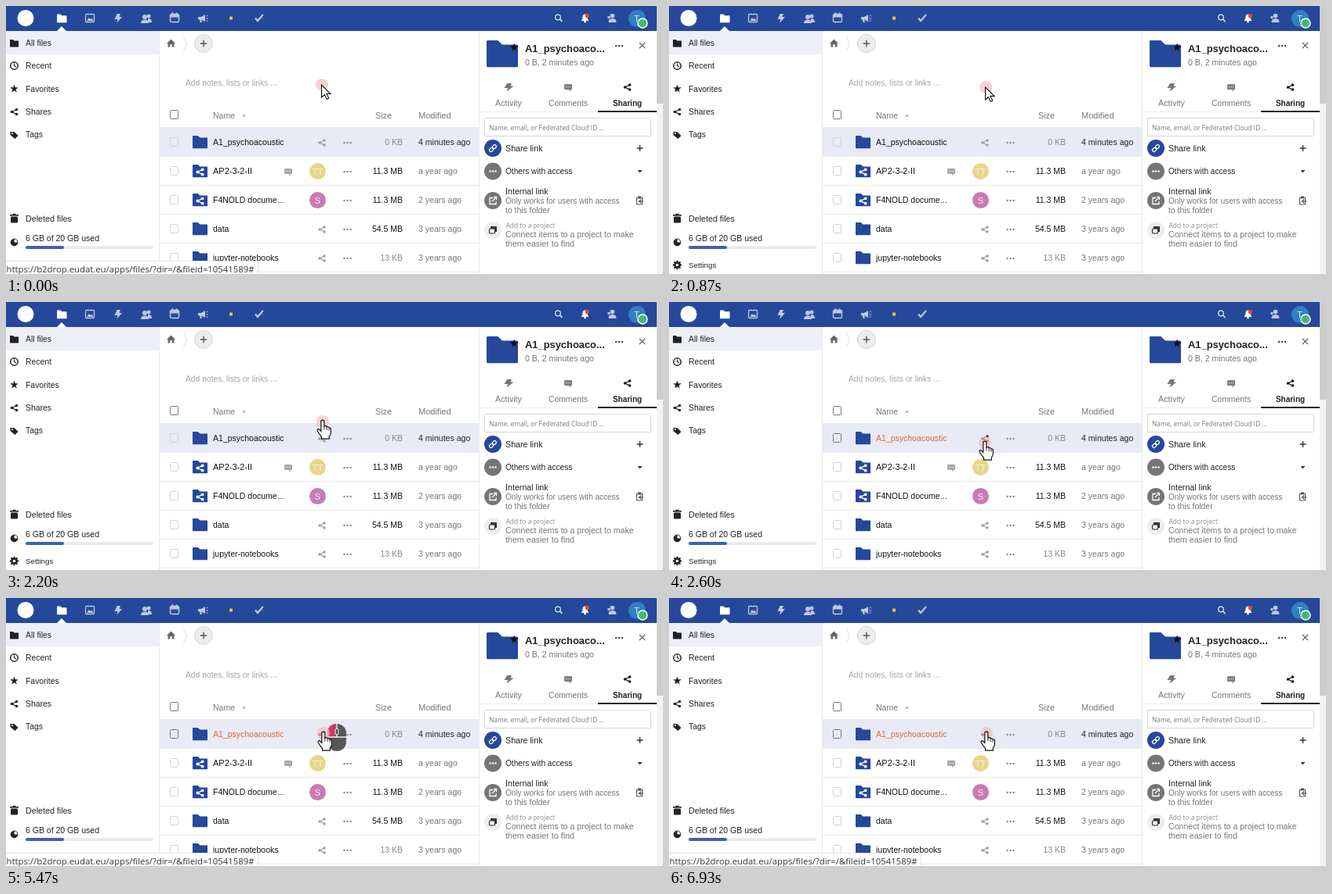
An HTML page with a canvas for the animation above (8000 ms loop, 838 by 343 pixels).

```html
<!DOCTYPE html>
<html lang="en">
<head>
<meta charset="utf-8">
<title>File sharing</title>
<style>
html, body { margin: 0; width: 100%; height: 100%; overflow: hidden; background: #fff; }
canvas { display: block; width: 838px; height: 343px; }
</style>
</head>
<body>
<canvas id="stage"></canvas>
<script>
const W = 838, H = 343, LOOP = 8000, FPS = 15;
const BLUE = '#25489a', INK = '#222', GREY = '#767676', LINE = '#e9e9e9', TINT = '#e8ebf5';
const SANS = '"Liberation Sans", Arial, sans-serif';
const HUMAN = '"Open Sans", sans-serif';
const canvas = document.getElementById('stage');
const c = canvas.getContext('2d');
const ratio = window.devicePixelRatio || 1;
canvas.width = W * ratio;
canvas.height = H * ratio;

function text(str, x, y, color = INK, size = 10.5, align = 'left', weight = 'normal', family = SANS) {
  c.font = `${weight} ${size}px ${family}`;
  c.textAlign = align;
  c.fillStyle = color;
  c.fillText(str, x, y);
}
function rect(x, y, w, h, color) {
  c.fillStyle = color;
  c.fillRect(x, y, w, h);
}
function round(x, y, w, h, r, fill, stroke, width = 1) {
  c.beginPath();
  c.roundRect(x, y, w, h, r);
  paint(fill, stroke, width);
}
function paint(fill, stroke, width = 1) {
  if (fill) { c.fillStyle = fill; c.fill(); }
  if (stroke) { c.strokeStyle = stroke; c.lineWidth = width; c.stroke(); }
}
function disc(x, y, r, fill, stroke, width) {
  c.beginPath();
  c.arc(x, y, r, 0, 7);
  paint(fill, stroke, width);
}
// SVG path data drawn around (x, y)
function shape(d, x, y, fill, stroke, width = 1) {
  c.save();
  c.translate(x, y);
  const p = new Path2D(d);
  if (fill) { c.fillStyle = fill; c.fill(p); }
  if (stroke) { c.strokeStyle = stroke; c.lineWidth = width; c.stroke(p); }
  c.restore();
}
function faded(alpha, draw) {
  if (alpha <= 0) return;
  c.save();
  c.globalAlpha = alpha;
  draw();
  c.restore();
}

function folder(x, y, w, color) {
  const k = w / 14;
  c.save();
  c.translate(x, y);
  c.scale(k, k);
  c.fillStyle = color;
  c.fill(new Path2D('M.5 0H5L7 1.9H13.5Q14 1.9 14 2.4V11.5Q14 12 13.5 12H.5Q0 12 0 11.5V.5Q0 0 .5 0Z'));
  c.restore();
}
function share(x, y, color, k = 1) {
  shape(`M${3 * k} ${-3 * k}L${-3 * k} 0L${3 * k} ${3 * k}`, x, y, null, color, 1.3 * k);
  for (const [dx, dy] of [[3, -3], [-3, 0], [3, 3]]) disc(x + dx * k, y + dy * k, 1.8 * k, color);
}
function dots(x, y, color, gap = 4, r = 1.2) {
  for (let i = -1; i < 2; i++) disc(x + i * gap, y, r, color);
}
function comment(x, y, color) {
  round(x - 5, y - 4, 10, 7, 1, color);
  shape('M0 2L3 2L3 5.5Z', x, y, color);
  dots(x, y - 0.5, '#fff', 2.4, 0.6);
}
function star(x, y, r, color) {
  c.beginPath();
  for (let i = 0; i < 10; i++) {
    const a = i * Math.PI / 5 - Math.PI / 2, q = i % 2 ? r * 0.42 : r;
    c.lineTo(x + q * Math.cos(a), y + q * Math.sin(a));
  }
  paint(color);
}
function people(x, y, color) {
  disc(x + 3, y - 3, 2.5, color);
  shape('M2 0Q7 0 7 5L2 5Z', x, y, color);
  disc(x - 2, y - 2, 3, color);
  shape('M-7 6Q-7 1.5 -2 1.5Q3 1.5 3 6Z', x, y, color);
}
function plus(x, y, r, color) {
  shape(`M${-r} 0H${r}M0 ${-r}V${r}`, x, y, null, color, 1.4);
}

function header() {
  rect(0, 0, 830, 32, BLUE);
  const soft = '#bcc8e2';
  disc(25, 15.5, 10.5, '#fff');
  folder(65, 10.5, 12.5, '#fff');
  shape('M-6 0L0 -6L6 0Z', 71, 32, '#fff');
  round(101.5, 10.5, 11, 10, 1, null, soft, 1.3);
  shape('M-4 3L-1 -1L1 1L2.5 -.5L4.5 3Z', 107, 16, soft);
  shape('M-1.5 -6L3 -6L1.5 -2L5 -2L-2 6L-.5 1L-4.5 1Z', 143, 16, soft);
  people(179, 16, soft);
  round(209.5, 10.5, 11, 10, 1.5, null, soft, 1.4);
  rect(210, 11, 10, 3.5, soft);
  rect(211.5, 8.5, 2, 3, soft);
  rect(216.5, 8.5, 2, 3, soft);
  shape('M-6 -2L-2 -2L3 -5L3 4L-2 1.5L-1 5L-3.5 5L-4 1.5L-6 1.5Z', 251, 16, soft);
  shape('M4.5 -3L6.5 -4M4.5 0H7M4.5 2.5L6.5 3.5', 251, 16, null, soft, 1);
  rect(285, 13.5, 4, 4, '#d9c65b');
  shape('M-5 0L-2 3.5L5 -4.5', 323, 15.5, null, soft, 2.2);

  disc(704, 14.5, 3.3, null, '#dce3f1', 1.3);
  shape('M2 2.5L5.5 6', 704, 14, null, '#dce3f1', 1.7);
  shape('M-5 4Q-3 2 -3 -1Q-3 -4.5 0 -4.5Q3 -4.5 3 -1Q3 2 5 4Z', 738.5, 15, '#fff');
  disc(738.5, 20, 1.4, '#fff');
  disc(741.5, 12.5, 2.7, '#e9402d');
  disc(773.5, 12.5, 2.8, soft);
  shape('M-5 5Q-5 0 0 0Q5 0 5 5Z', 773.5, 16, soft);
  disc(769, 14.5, 1.8, soft);
  disc(805, 16, 11, '#317fc3');
  text('T', 804.5, 20, '#d7e8f7', 11.5, 'center');
  disc(812, 22, 6, '#4cb478', '#fff', 1.4);
}

function navigation() {
  rect(0, 32, 195, 30, '#edeff7');
  rect(195, 32, 1, 311, LINE);
  folder(5, 43, 11, INK);
  disc(10.5, 76.5, 4.7, null, INK, 1.5);
  shape('M0 -3V0L2.5 1.5', 10.5, 76.5, null, INK, 1.2);
  star(10.5, 106, 5.5, INK);
  share(10.5, 135.5, INK);
  shape('M-5 -4L0 -4L5 1L1 5L-5 0Z', 10.5, 165, INK);
  disc(8, 163, 1, '#fff');
  ['All files', 'Recent', 'Favorites', 'Shares', 'Tags'].forEach((s, i) =>
    text(s, 25, 51 + i * 29.25, INK, 10.4));

  round(6, 269.5, 9, 8, 1, INK);
  rect(5, 267, 11, 1.6, INK);
  rect(8.5, 265.8, 4, 1.5, INK);
  text('Deleted files', 25, 276, INK, 10.7);
  disc(10.5, 302.5, 4.4, null, INK, 1);
  shape('M0 -4.4A4.4 4.4 0 1 0 4.4 0H0Z', 10.5, 302.5, INK);
  text('6 GB of 20 GB used', 25, 301, INK);
  round(25, 307, 163, 4, 2, '#ebebeb');
  round(25, 307, 49, 4, 2, '#4360ae');
  for (let i = 0; i < 8; i++) {
    const a = i * Math.PI / 4;
    disc(10.5 + 4.5 * Math.cos(a), 331.5 + 4.5 * Math.sin(a), 1.2, INK);
  }
  disc(10.5, 331.5, 3, null, INK, 2.4);
  text('Settings', 25, 335, INK, 9.8);
}

const rows = [
  ['A1_psychoacoustic', '0 KB', '4 minutes ago'],
  ['AP2-3-2-II', '11.3 MB', 'a year ago', '#e5d788', 'TT'],
  ['F4NOLD docume...', '11.3 MB', '2 years ago', '#c97bb5', 'S'],
  ['data', '54.5 MB', '3 years ago'],
  ['jupyter-notebooks', '13 KB', '3 years ago']
];

function checkbox(y, color) {
  round(209.5, y - 5.5, 10, 11, 1, null, color);
}

function files(hover) {
  shape('M-5.5 .5L0 -5L5.5 .5H4V5H1.2V1.5H-1.2V5H-4V.5Z', 210.5, 47.5, '#666');
  shape('M-2 -9L2 0L-2 9', 228.5, 48, null, '#dedede', 1);
  disc(252, 48, 11.5, '#ededed', '#d5d5d5', 1);
  plus(252, 48, 4.2, '#555');
  text('Add notes, lists or links ...', 229, 102, '#a4a4a4', 10.3);

  checkbox(139, '#777');
  text('Name', 264, 143.5, GREY);
  shape('M-2.5 1.5L0 -1.5L2.5 1.5Z', 303.5, 140, '#aaa');
  text('Size', 471, 143.5, GREY, 10.8);
  text('Modified', 526, 143.5, GREY, 11);
  rect(196, 155, 407, 1, LINE);

  rows.forEach(([name, size, date, tint, initials], i) => {
    const y = 174 + i * 37, first = i === 0, on = first && hover;
    if (first) rect(196, 156, 407, 36, TINT);
    rect(196, y + 18, 407, 1, LINE);
    checkbox(y, on ? '#777' : '#d2d3d8');
    folder(238, y - 8, 19, BLUE);
    text(name, 264, y + 4.3, on ? '#e2682f' : '#111', i === 1 ? 11 : 10.5);
    if (tint) {
      share(247.5, y + 1.5, '#fff', 1.05);
      disc(397.5, y + 0.5, 10.5, tint);
      text(initials, 397.5, y + 4.5, '#f8f3ec', 11, 'center');
    } else {
      share(403, y + 1, on ? '#333' : '#a0a0a0');
    }
    if (i === 1) comment(360, y + 1, '#a8a8a8');
    dots(435.5, y + 1, '#888');
    const kb = size.endsWith('KB');
    text(size, 506, y + 4.3, kb ? '#888' : '#111', 10.5, 'right');
    text(date, 526, y + 4.3, first ? '#222' : '#777', 10.55);
  });
}

function panelHead(age) {
  rect(603, 32, 227, 311, '#fff');
  rect(603, 32, 1, 311, LINE);
  folder(613, 44, 40, BLUE);
  star(648, 53, 5.5, '#111');
  text('A1_psychoaco...', 662, 59, '#222', 12.9, 'left', 'bold');
  text(`0 B, ${age} minutes ago`, 662, 76, GREY, 10.55);
  dots(782, 51, '#444');
  shape('M-3.7 -3.7L3.7 3.7M3.7 -3.7L-3.7 3.7', 811.5, 50.5, null, '#555', 1.2);
}

function panelBody() {
  shape('M-2.5 -5L3.5 -5L2 -1.5L6 -1.5L-3 5.5L-1.5 1L-6 1Z', 641.5, 104, '#777');
  comment(717, 104, '#808080');
  share(792.5, 104, '#111');
  text('Activity', 641, 127.5, GREY, 10.7, 'center');
  text('Comments', 717, 127.5, GREY, 10.4, 'center');
  text('Sharing', 792.5, 127.5, '#222', 10, 'center', 'bold');
  rect(604, 135, 226, 1, '#ececec');
  rect(755, 134, 75, 2, '#222');

  round(610.5, 143.5, 212, 23, 2, '#fff', '#d5d5d5');
  text('Name, email, or Federated Cloud ID ...', 616, 158.5, '#777', 8.33, 'left', 'normal', HUMAN);

  disc(621, 182, 11, BLUE);
  c.save();
  c.translate(621, 182);
  c.rotate(-Math.PI / 4);
  round(-5.5, -2, 5.5, 4, 2, null, '#fff', 1.3);
  round(0, -2, 5.5, 4, 2, null, '#fff', 1.3);
  c.restore();
  text('Share link', 637, 186, '#222', 10.7);
  plus(808.5, 182, 4, '#333');

  disc(621, 211.5, 11, '#757575');
  dots(621, 211.5, '#fff', 3.5);
  text('Others with access', 637, 215, '#222', 10.1);
  shape('M-3 -1.5H3L0 2Z', 808.5, 211.5, '#333');

  disc(621, 249, 11, '#757575');
  shape('M0 -3.5H-4V4.5H4V1M-1 1L4 -4M1 -4.5H4.5V-1', 621, 249, null, '#fff', 1.3);
  text('Internal link', 637, 241, '#222', 10.7);
  text('Only works for users with access', 637, 253, GREY, 10);
  text('to this folder', 637, 265, GREY, 10.4);
  round(804.5, 245, 7, 9, 1, null, '#555', 1.2);
  rect(806, 243.5, 4, 3, '#555');
  shape('M4.5 1H-1M1 -1.2L-1.5 1L1 3.2', 809, 249, null, '#555', 1.2);

  disc(621, 287, 11, '#ededed');
  rect(618, 282, 8, 7, '#333');
  round(616.5, 285, 7, 6, 1, '#ededed', '#333', 1.2);
  text('Add to a project', 637.5, 284, '#888', 8.45, 'left', 'normal', HUMAN);
  text('Connect items to a project to make', 637, 296, GREY, 10.6);
  text('them easier to find', 637, 307.5, GREY, 10.7);
}

function statusBar() {
  rect(0, 326, 322, 17, '#e2e2e2');
  rect(0, 327, 321, 16, '#fff');
  text('https://b2drop.eudat.eu/apps/files/?dir=/&fileid=10541589#', 0.5, 340.5,
    '#333', 11.33, 'left', 'normal', HUMAN);
}

function mouseIcon() {
  round(410, 161, 24, 35, 12, '#575757');
  shape('M-1 -17Q-12 -16 -12 -4V0H-1Z', 422, 178, '#c93a66');
  shape('M-12 0H12M0 -17V0', 422, 178, null, '#f1f1f1', 1.4);
  round(420, 167, 4, 8, 2, '#575757', '#f1f1f1', 1);
}

const ARROW = 'M0 0V16L3.8 12.5L6.7 18.3L9.3 17.1L6.4 11.4H11.5Z';
const HAND = 'M-2.2 0Q-2.2 -1.8 -.2 -1.8Q1.8 -1.8 1.8 0V6Q4.5 4.8 5.2 7Q7.4 6 8 8.2Q10.4 7.6 10.4 10V14Q10 17.5 8.3 19V22.2H-1.5V19.5Q-4.5 16 -6.6 12.2Q-7.6 9.5 -5.2 9.6L-2.2 12.3Z';

function cursor(x, y, hand) {
  faded(0.68, () => disc(x, y, 8, '#f9b9bd'));
  if (!hand) return shape(ARROW, x - 0.5, y, '#fff', '#111', 1.1);
  shape(HAND, x, y, '#fff', '#111', 1.2);
  shape('M1.8 6V10.5M5.2 7.5V11M8 9V11.5', x, y, null, '#111', 0.9);
}

// Pointer path: [step, x, y]
const path = [
  [0, 403, 101], [11, 403, 101], [13, 404, 104], [28, 404, 104], [31, 404, 124],
  [33, 404, 153], [36, 403, 172], [39, 403, 180], [42, 403, 180], [45, 405, 173], [120, 405, 173]
];
function pointer(step) {
  const i = path.findIndex((p, k) => k && step <= p[0]);
  const [s0, x0, y0] = path[i - 1], [s1, x1, y1] = path[i];
  const u = (step - s0) / (s1 - s0);
  return [x0 + (x1 - x0) * u, y0 + (y1 - y0) * u];
}
const clamp = v => Math.max(0, Math.min(1, v));

function draw(ms) {
  const step = Math.floor((ms + 5) * FPS / 1000) % (LOOP * FPS / 1000);
  const [x, y] = pointer(step);
  c.setTransform(ratio, 0, 0, ratio, 0, 0);
  rect(0, 0, W, H, '#fff');
  navigation();
  files(step > 33 && y >= 156);
  panelHead(step < 98 ? 2 : 4);
  faded(step < 98 ? 1 : clamp((step - 98) / 6), panelBody);
  header();
  rect(830, 0, 8, H, '#f2f2f2');
  rect(830, 0, 8, 125, '#cdcdcd');
  faded(step < 40 ? clamp(1 - step / 3) : clamp((step - 40) / 5), statusBar);
  if (step >= 82 && step < 97) mouseIcon();
  cursor(x, y, step >= 33);
}

const start = performance.now();
function tick() {
  draw((performance.now() - start) % LOOP);
  requestAnimationFrame(tick);
}
tick();
</script>
</body>
</html>
```
